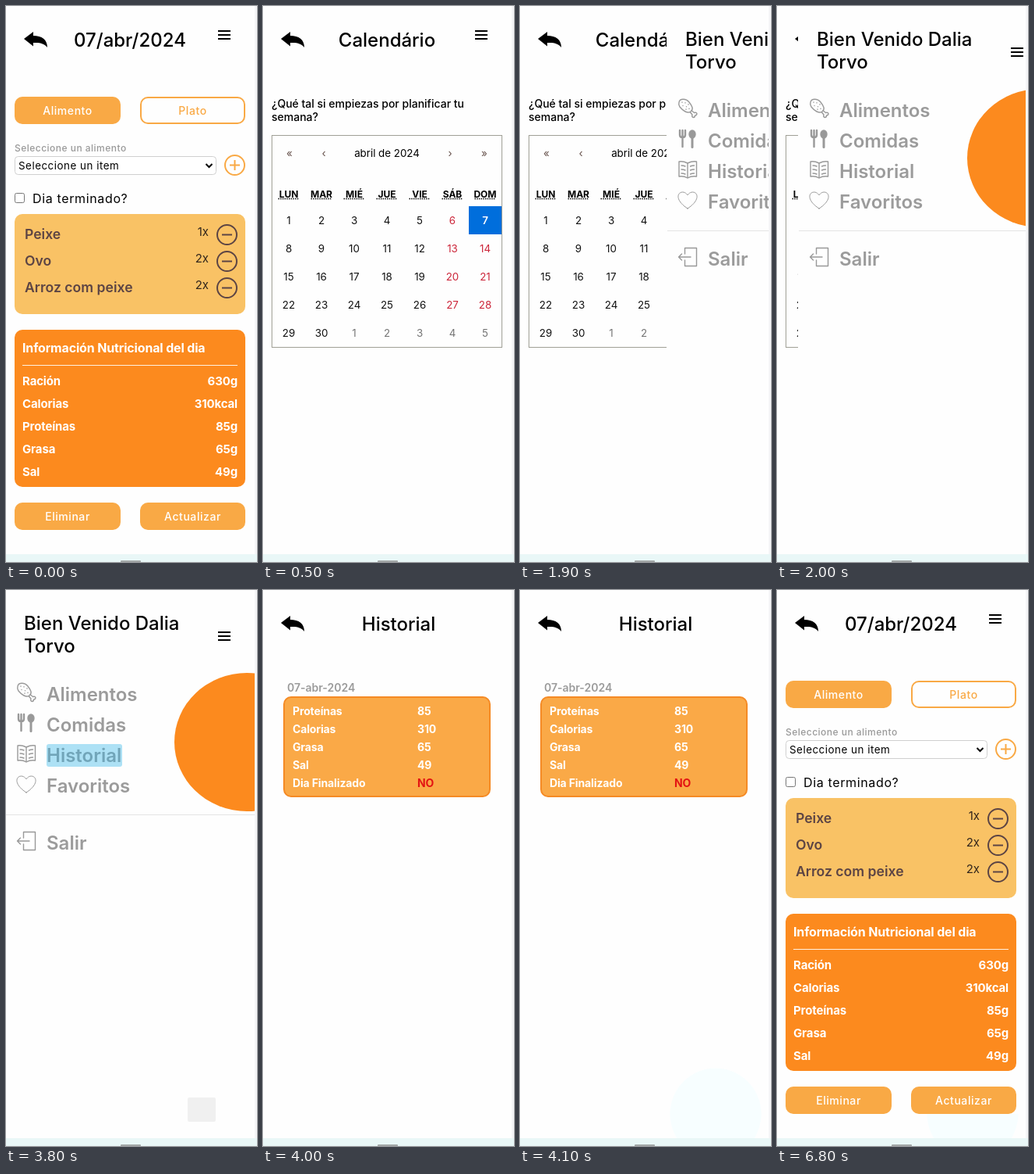
These frames come from a looping animation (322 by 711 pixels, 8 s). An HTML page:

```html
<!DOCTYPE html>
<html lang="es">
<head>
<meta charset="utf-8">
<title>Plan de comidas</title>
<style>
  html, body { margin: 0; width: 100%; height: 100%; overflow: hidden; background: #fefefe; }
  svg { display: block; width: 100%; height: 100%; font-family: Inter, sans-serif; }
  text { white-space: pre; }
  .title { font-size: 24px; font-weight: 500; }
  .item { font-size: 24px; font-weight: 600; fill: #9b9b9b; }
  .wide { letter-spacing: .04em; }
  .button { font-size: 14px; font-weight: 500; letter-spacing: .04em; }
  .food { font-size: 17.6px; font-weight: 600; fill: #5c4444; }
  .bold { font-weight: 700; letter-spacing: -.01em; fill: #fff; }
  .day { font-size: 13.33px; }
  .weekday { font-size: 12px; font-weight: 700; }
  .icon { fill: none; stroke: #999; stroke-width: 1.4; stroke-linecap: round; stroke-linejoin: round; }
</style>
</head>
<body>
<svg id="stage" viewBox="0 0 322 711"></svg>
<script>
const DURATION = 8000;
const PAPER = '#fefefe', AMBER = '#f9a945', ORANGE = '#fc8a1e', BROWN = '#5c4444';

const text = (x, y, content, cls, { size, fill, anchor = 'start', weight } = {}) =>
  `<text x="${x}" y="${y}" class="${cls}" text-anchor="${anchor}" style="${size ? `font-size:${size}px;` : ''}${
    fill ? `fill:${fill};` : ''}${weight ? `font-weight:${weight}` : ''}">${content}</text>`;
const rect = (x, y, w, h, fill, r = 0, stroke = 'none', sw = 1) =>
  `<rect x="${x}" y="${y}" width="${w}" height="${h}" rx="${r}" fill="${fill}" stroke="${stroke}" stroke-width="${sw}"/>`;
const path = (d, stroke, width = 2, extra = '') =>
  `<path d="${d}" fill="none" stroke="${stroke}" stroke-width="${width}" ${extra}/>`;
const circle = (x, y, r, stroke) =>
  `<circle cx="${x}" cy="${y}" r="${r}" fill="none" stroke="${stroke}" stroke-width="2"/>`;
const group = (id, content) => `<g id="${id}">${content}</g>`;
const each = (list, draw) => list.map(draw).join('');

const backArrow = '<path d="M23 42 35 33V38C46 38 53 43 53 53 49 48 44 46.5 35 47V51.5Z"/>';
const burger = y => path(`M272 ${y - 5}h16m-16 5h16m-16 5h16`, '#000');
const heading = (x, content) => backArrow + text(x, 52, content, 'title', { anchor: 'middle' });

function button(x, y, width, label, outlined) {
  const box = outlined
    ? rect(x + 1, y + 1, width - 2, 33, PAPER, 9, AMBER, 2)
    : rect(x, y, width, 35, AMBER, 10);
  return box + text(x + width / 2, y + 23, label, 'button',
    { anchor: 'middle', fill: outlined ? AMBER : '#fff' });
}

function dayPage() {
  const foods = [['Peixe', '1x'], ['Ovo', '2x'], ['Arroz com peixe', '2x']];
  const facts = [['Ración', '630g'], ['Calorias', '310kcal'], ['Proteínas', '85g'], ['Grasa', '65g'], ['Sal', '49g']];
  return rect(0, 0, 319, 670, PAPER) + heading(159, '07/abr/2024') + burger(37) +
    button(11, 116, 136, 'Alimento') + button(172, 116, 135, 'Plato', true) +
    text(11, 186, 'Seleccione un alimento', 'wide', { size: 12, fill: '#999', weight: 500 }) +
    rect(11.5, 192.5, 258, 23, '#fff', 4, '#d0d0d0') +
    text(16, 209, 'Seleccione un item', 'wide', { size: 13.33 }) +
    path('M256.500 202l4 4 4-4', '#000') +
    circle(293.5, 203.5, 12.5, AMBER) + path('M287 203.500h13m-6.500-6.500v13', AMBER) +
    rect(11.5, 239.5, 12, 12, '#fff', 2, '#767676') +
    text(34, 252, 'Dia terminado?', 'wide', { size: 16 }) +
    rect(11, 266, 296, 128, '#f9c265', 10) +
    each(foods, ([name, count], i) => {
      const y = 292.5 + 34 * i;
      return text(24, y + 5.5, name, 'food') +
        text(260, y + 1.5, count, '', { size: 15, anchor: 'end', fill: '#33261c' }) +
        circle(283.5, y, 12.5, BROWN) + path(`M277 ${y}h13`, BROWN);
    }) +
    rect(11, 414, 296, 201, ORANGE, 10) +
    text(21, 443, 'Información Nutricional del dia', 'bold', { size: 16 }) +
    path('M21 459.500H297', '#fff0e0', 1) +
    each(facts, ([name, value], i) =>
      text(21, 485 + 29 * i, name, 'bold', { size: 15 }) +
      text(297, 485 + 29 * i, value, 'bold', { size: 15, anchor: 'end' })) +
    button(11, 635, 136, 'Eliminar') + button(172, 635, 135, 'Actualizar');
}

function calendarPage() {
  const column = i => 33 + 42 * i;
  const center = { anchor: 'middle' };
  const navigation = [['«', 34], ['‹', 78], ['›', 240], ['»', 284]];
  const days = Array.from({ length: 35 }, (_, i) => {
    const selected = i === 6, next = i >= 30;
    const fill = selected ? '#fff' : next ? '#757575' : i % 7 > 4 ? '#cc263a' : '#111';
    return text(column(i % 7), 279 + 36 * Math.floor(i / 7), next ? i - 29 : i + 1, 'day',
      { anchor: 'middle', fill, weight: selected ? 600 : 400 });
  }).join('');
  return heading(159, 'Calendário') + burger(37) +
    text(11, 130, '¿Qué tal si empiezas por planificar tu', '', { size: 14, weight: 500 }) +
    text(11, 147, 'semana?', '', { size: 14, weight: 500 }) +
    rect(11.5, 165.5, 295, 271, 'none', 0, '#a0a096') +
    each(navigation, ([sign, x]) => text(x, 193, sign, 'day', { anchor: 'middle', fill: '#65504a' })) +
    text(159, 193, 'abril de 2024', 'day', center) +
    each(['LUN', 'MAR', 'MIÉ', 'JUE', 'VIE', 'SÁB', 'DOM'], (name, i) =>
      text(column(i), 245, name, 'weekday', center) +
      path(`M${column(i) - 13.5} 246.500h27`, '#000', 1.4, 'stroke-dasharray="1.5 1.200"')) +
    rect(264, 256, 42, 36, '#006edc') + days;
}

function menuPage() {
  const items = [['Alimentos', 142], ['Comidas', 181], ['Historial', 220], ['Favoritos', 259], ['Salir', 332]];
  const drumstick = `<path d="M15 123C16 118 24 118 28 123 32 128 34 132 30 135 26 138 20 134 16 129Q14 126 15 123Z
    M31.500 134l3 2.500q3-1 3.500 1.500-.500 2-2.500 2 0 2.500-2 2.500-2.500-.500-1.500-3.500l-3-3.500
    M19 123v.2m4 .5v.2m-3 3.500v.2m4.500 1v.2m2.500-3v.2m-3 6v.2m4-1v.2"/>`;
  const fork = '<path d="M16 159v6q0 3 3.500 3t3.500-3v-6m-3.500 0v21" stroke-width="2.400"/>';
  const spoon = '<ellipse cx="32" cy="164" rx="4" ry="5" fill="#999"/><path d="M32 168v12.500" stroke-width="3"/>';
  const book = `<path d="M26 201Q20 198 15 199V218Q21 217 26 220 31 217 37.500 218V199Q32 198 26 201V220
    M18 204q3 0 5 1m-5 4q3 0 5 1m-5 4q3 0 5 1M34.500 204q-3 0-5 1m5 4q-3 0-5 1m5 4q-3 0-5 1"/>`;
  const heart = '<path d="M26 259C9 248 13 238 19.500 238 24 238 26 242 26 242S28 238 32.500 238C39 238 43 248 26 259Z" stroke-width="1"/>';
  const exit = '<path d="M22.500 317V309.500H37.500V332.500H22.500V325M30 321H14.500m4-4-4 4 4 4"/>';
  return rect(-1, 0, 321, 701, PAPER) +
    text(23, 51, 'Bien Venido Dalia', 'title') + text(23, 80, 'Torvo', 'title') + burger(59) +
    `<ellipse cx="309" cy="194.500" rx="93" ry="88.500" fill="${ORANGE}"/>` +
    each(items, ([name, y]) => text(52, y, name, 'item')) +
    `<g class="icon">${drumstick + fork + spoon + book + heart + exit}</g>` +
    path('M0 287.500H319', '#e4e4e4', 1) +
    group('highlight', rect(52, 197, 97, 29, 'rgba(51,181,229,.4)', 3)) +
    group('touch', rect(233, 649, 36, 31, '#f0f0f0', 2));
}

function historyPage() {
  const rows = [['Proteínas', 85], ['Calorias', 310], ['Grasa', 65], ['Sal', 49], ['Dia Finalizado', 'NO']];
  return heading(174, 'Historial') +
    text(31, 130, '07-abr-2024', '', { size: 14, weight: 600, fill: '#9b9b9b' }) +
    rect(27, 137, 264, 127, '#faa947', 9, '#f58a24', 2) +
    each(rows, ([name, value], i) =>
      text(38, 160 + 23 * i, name, 'bold', { size: 14 }) +
      text(198, 160 + 23 * i, value, 'bold', { size: 14, fill: value === 'NO' ? '#e31313' : '#fff' }));
}

document.getElementById('stage').innerHTML =
  rect(0, 0, 322, 711, PAPER) +
  group('glow', '<circle cx="251" cy="670" r="58.500" fill="#f7feff"/>') +
  group('day', dayPage()) + group('calendar', calendarPage()) +
  group('history', historyPage()) + group('menu', menuPage()) +
  rect(319, 0, 3, 701, '#f5f5f7') + rect(0, 701, 322, 10, '#e9f7f7') +
  rect(147, 709, 26, 3, '#a3a8a8', 1);

const part = id => document.getElementById(id);
const show = (id, visible) => { part(id).style.display = visible ? '' : 'none'; };

function render(t) {
  const within = (from, to) => t >= from && t < to;
  show('day', t < 500 || t >= 6800);
  show('calendar', within(500, 2100));
  show('menu', within(1900, 4000));
  show('history', within(4000, 6800));
  show('highlight', within(3800, 4000));
  show('touch', within(3800, 3900));
  show('glow', t >= 4100);
  // The drawer slides in at ten pictures per second.
  const offset = t < 2000 ? 189 : t < 2100 ? 28 : 0;
  part('menu').setAttribute('transform', `translate(${offset} 0)`);
  part('highlight').style.opacity = t < 3900 ? 1 : .5;
}

function tick() {
  render(performance.now() % DURATION);
  requestAnimationFrame(tick);
}
tick();
</script>
</body>
</html>
```
